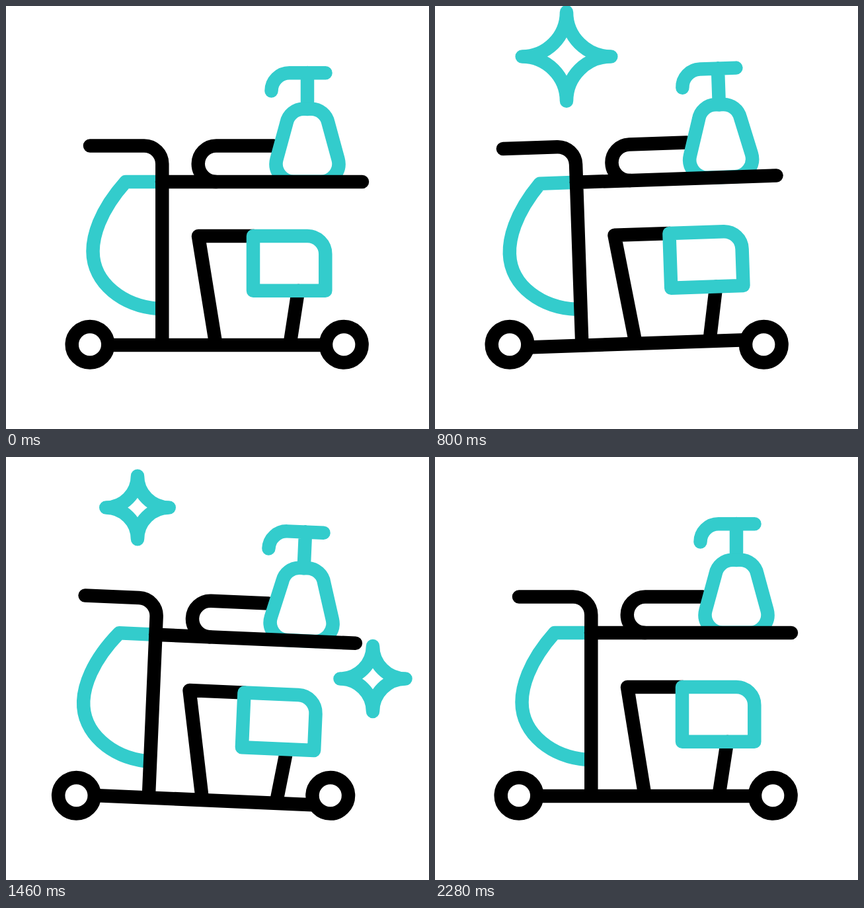
Write an HTML page that moves like this. It is 640 px wide and 640 px high and loops after 2.4 s.

```html
<!DOCTYPE html>
<html lang="en">
<head>
<meta charset="utf-8">
<title>Cleaning cart</title>
<style>
html, body { margin: 0; height: 100%; overflow: hidden; background: #fff; }
svg { display: block; width: 100vw; height: 100vh; }
path, circle { fill: none; stroke: #000; stroke-width: 20.5; stroke-linecap: round; stroke-linejoin: round; }
.accent { stroke: #33cccc; }
circle { fill: #fff; }
</style>
</head>
<body>
<svg viewBox="0 0 640 640">
  <g id="body">
    <path class="accent" d="M236 266H181C140 312 131.5 350 131.5 371C131.5 420 178 454 230 458"/>
    <path d="M405 211.5H318a27.2 27.2 0 0 0 0 54.5"/>
    <path class="accent" d="M401.5 128.5a27.3 27.3 0 0 1 27.3-27.3H483.5M456 101V156"/>
    <path class="accent" d="M450 155.8h12a26 26 0 0 1 25.5 21l15 55a27 27 0 0 1-26 34h-41a27 27 0 0 1-26-34l15-55a26 26 0 0 1 25.5-21z"/>
    <path d="M127 211.5H209a27.3 27.3 0 0 1 27.3 27.3V512M236 266H539"/>
    <path d="M375 348H291L317.5 512M442 431L429.5 512"/>
    <path style="stroke-linecap:butt" d="M154 513H484"/>
    <path class="accent" d="M374 348H456a27.3 27.3 0 0 1 27.3 27.3V430.7H374z"/>
  </g>
  <g id="wheels">
    <circle cx="127" cy="512.3" r="27.3"/>
    <circle cx="511.3" cy="512.3" r="27.3"/>
  </g>
  <path id="bigStar" class="accent" transform="translate(199 76.5)"/>
  <path id="smallStar" class="accent" transform="translate(555 335.5)"/>
</svg>
<script>
const LOOP = 2400, BEAT = 540, START = 20;
const STAR_SIZE = 67.5, STAR_DIP = 23, STAR_RAMP = 200;
const $ = id => document.getElementById(id);

const clamp = p => Math.min(1, Math.max(0, p));
const ease = p => (1 - Math.cos(Math.PI * clamp(p))) / 2;

// Turning points are [time in ms, value]; each move eases from one to the next.
const swing = (t, turns) => turns.reduce((value, [time, to], i) => {
  if (!i) return to;
  const [before, from] = turns[i - 1];
  return value + (to - from) * ease((t - before) / (time - before));
}, 0);

// The cart rolls back and forth, one move per beat.
const roll = [0, -46, 31, -37.5, 0].map((x, i) => [START + i * BEAT, x]);
const bob = [[0, 0], [480, 11.5], [1060, -12], [1420, 6.5], [1800, -9.4], [2160, 0]];
const tilt = [[0, 0], [560, -2.65], [1580, 2.65], [2150, 0]];

// A star grows, dips once halfway through its life and shrinks away.
function starSize(t, start, end) {
  const ramp = ease(Math.min(t - start, end - t) / STAR_RAMP);
  const life = clamp((t - start - STAR_RAMP) / (end - start - 2 * STAR_RAMP));
  return ramp * (STAR_SIZE - STAR_DIP * ease(2 * Math.min(life, 1 - life)));
}

function drawStar(star, r) {
  const arc = (x, y) => `A${r} ${r} 0 0 0 ${x} ${y}`;
  star.setAttribute('d', r < 2 ? '' : `M0 ${-r}` + arc(r, 0) + arc(0, r) + arc(-r, 0) + arc(0, -r) + 'z');
}

function draw() {
  const t = performance.now() % LOOP;
  const x = swing(t, roll);
  $('wheels').setAttribute('transform', `translate(${x})`);
  $('body').setAttribute('transform',
    `translate(${x} ${swing(t, bob)}) rotate(${swing(t, tilt)} 319 512)`);
  drawStar($('bigStar'), starSize(t, 570, 2080));
  drawStar($('smallStar'), starSize(t, 940, 2270));
  requestAnimationFrame(draw);
}
draw();
</script>
</body>
</html>
```
